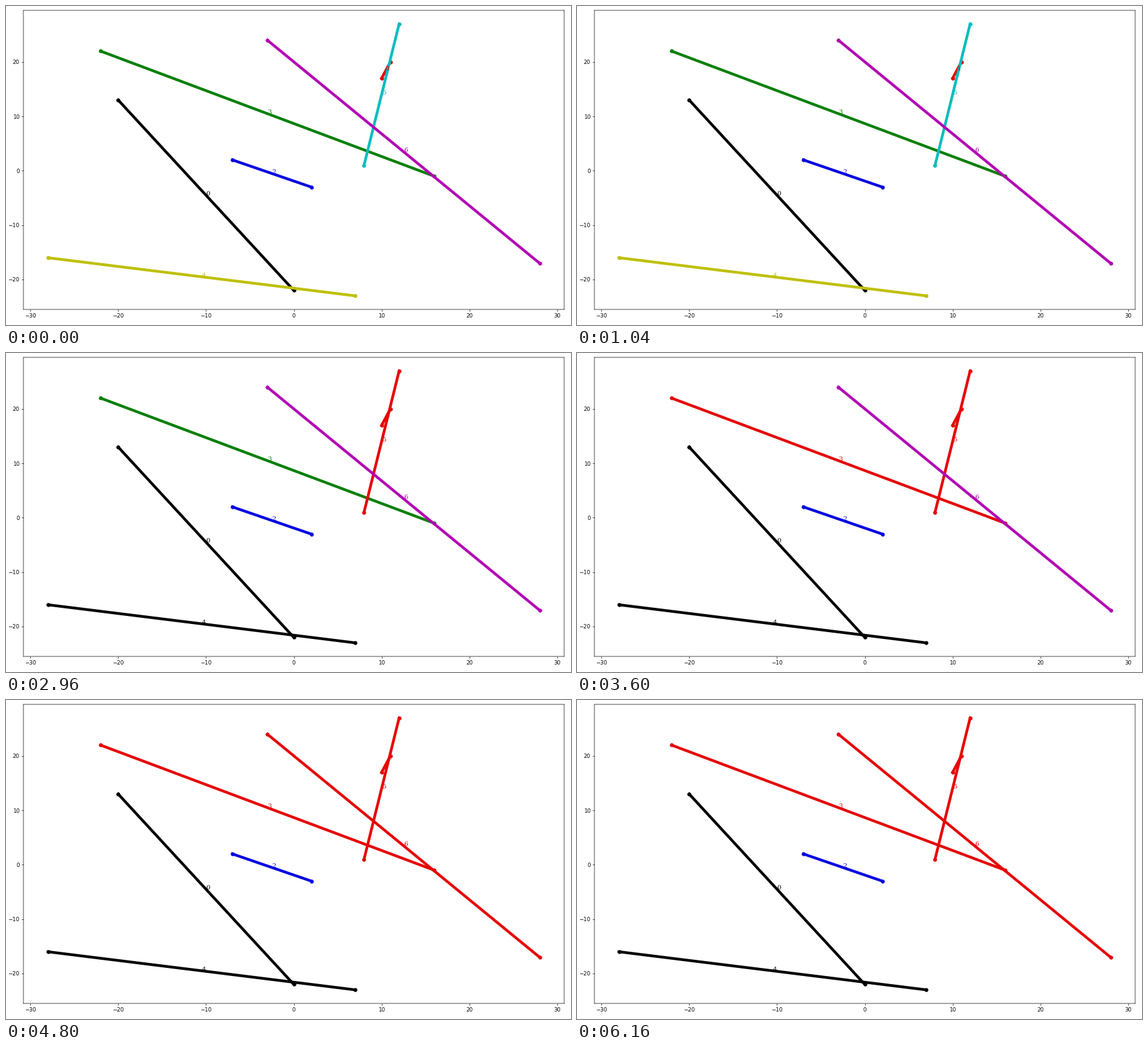
A matplotlib script that plays this animation: 908x512 px, repeating every 6.24 s.

```python
import matplotlib.pyplot as plt
from matplotlib.animation import FuncAnimation

DPI = 64
WIDTH, HEIGHT = 908, 512
INTERVAL = 80
FRAMES = 78

BLACK, RED, BLUE, GREEN = "#000000", "#e60404", "#0404e0", "#067f06"
YELLOW, CYAN, MAGENTA = "#bfbf08", "#08bcbf", "#b204b4"

# (start, end, initial colour) in plot coordinates
SEGMENTS = [
    ((-20, 13), (0, -22), BLACK),
    ((10, 17), (11, 20), RED),
    ((-7, 2), (2, -3), BLUE),
    ((-22, 22), (16, -1), GREEN),
    ((-28, -16), (7, -23), YELLOW),
    ((8, 1), (12, 27), CYAN),
    ((-3, 24), (28, -17), MAGENTA),
]

# Segments joining a connected group: (time in ms, segment, group colour)
MERGES = [(1200, 4, BLACK), (2400, 5, RED), (3600, 3, RED), (4800, 6, RED)]

plt.rcParams.update({"font.family": "DejaVu Sans", "font.size": 9.75})
fig = plt.figure(figsize=(WIDTH / DPI, HEIGHT / DPI), dpi=DPI, facecolor="white")
left, right, top, bottom = 28, 897, 7, 487
ax = fig.add_axes([left / WIDTH, 1 - bottom / HEIGHT,
                   (right - left) / WIDTH, (bottom - top) / HEIGHT])
ax.set_xlim(-30.8, 30.8)
ax.set_ylim(-25.5, 29.5)
ax.set_xticks(range(-30, 31, 10))
ax.set_yticks(range(-20, 21, 10))
for spine in ax.spines.values():
    spine.set_snap(False)


def add_segment(index, start, end, color):
    (x0, y0), (x1, y1) = start, end
    line, = ax.plot([x0, x1], [y0, y1], "o-", color=color, lw=4.95, ms=6)
    label = ax.text((x0 + x1) / 2, (y0 + y1) / 2, str(index), color=color,
                    family="DejaVu Serif", size=11.7)
    return line, label


artists = [add_segment(i, *segment) for i, segment in enumerate(SEGMENTS)]


def update(frame):
    colors = [color for _, _, color in SEGMENTS]
    for time, index, color in MERGES:
        if frame * INTERVAL >= time:
            colors[index] = color
    for pair, color in zip(artists, colors):
        for artist in pair:
            artist.set_color(color)
    return [artist for pair in artists for artist in pair]


anim = FuncAnimation(fig, update, frames=FRAMES, interval=INTERVAL,
                     repeat=True, repeat_delay=0)
plt.show()
```
